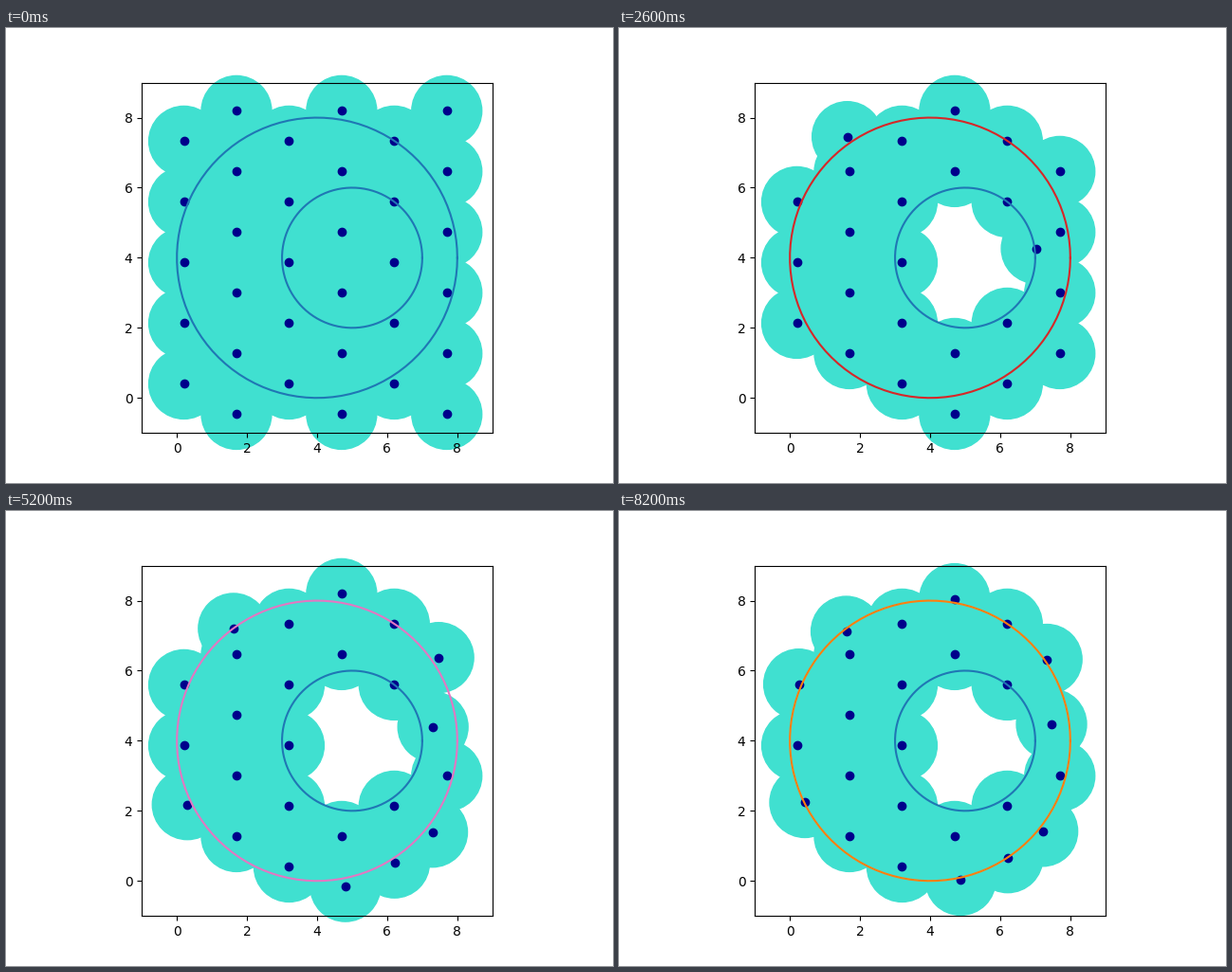
These frames come from a looping animation (640 by 480 pixels, 8.4 s). A matplotlib script:

```python
import numpy as np
import matplotlib.pyplot as plt
from matplotlib.animation import FuncAnimation
from matplotlib.patches import Circle

FRAMES, INTERVAL = 42, 200
OUTER, INNER = (4, 4, 4), (5, 4, 2)
USELESS = 0.9   # a disc this far off the ring is dropped
CROWD = 0.56    # a disc this close to a moved one is dropped
H = np.sqrt(3)

# Where the movable discs settle, keyed by lattice (column, row).
AIM = {
    (0, 1): (0.456, 2.252), (0, 3): (0.293, 5.63), (1, 5): (1.6, 7.04),
    (3, 0): (4.893, 0.088), (3, 5): (4.7, 8.015), (4, 0): (6.219, 0.71),
    (4, 2): (7.517, 4.498), (5, 1): (7.138, 1.44), (5, 4): (7.3, 6.311),
}


def lattice():
    return {(c, r): np.array([0.2 + 1.5 * c, 0.4 + H * (r - c % 2 / 2)])
            for c in range(6) for r in range(5 + c % 2)}


def gap(p):
    """Distance from p to the ring between the two circles."""
    (xo, yo, ro), (xi, yi, ri) = OUTER, INNER
    return max(np.hypot(p[0] - xo, p[1] - yo) - ro,
               ri - np.hypot(p[0] - xi, p[1] - yi))


def advance(discs, step):
    """Drop the most useless disc, or pull the one farthest from its aim."""
    discs = dict(discs)
    worst = max(discs, key=lambda k: gap(discs[k]))
    if gap(discs[worst]) > USELESS:
        del discs[worst]
        return discs
    key = max(AIM, key=lambda k: np.hypot(*(AIM[k] - discs[k])))
    pull = 0.26 + 0.4 * (step / FRAMES) ** 2
    pos = discs[key] + pull * (AIM[key] - discs[key])
    discs = {k: p for k, p in discs.items() if np.hypot(*(p - pos)) > CROWD}
    discs[key] = pos
    return discs


def ring(x, y, r):
    t = np.linspace(0, 2 * np.pi, 100)
    return ax.plot(x + r * np.cos(t), y + r * np.sin(t), color="C0")[0]


states = [lattice()]
for step in range(1, FRAMES):
    states.append(advance(states[-1], step))

fig, ax = plt.subplots(figsize=(6.4, 4.8), dpi=100)
ax.set_aspect("equal")
ax.set_xlim(-1, 9)
ax.set_ylim(-1, 9)

patches = {k: ax.add_patch(Circle(p, 1, color="turquoise", clip_on=False))
           for k, p in states[0].items()}
dots = ax.scatter(*zip(*states[0].values()), color="darkblue")
outer, inner = ring(*OUTER), ring(*INNER)


def update(step):
    discs = states[step]
    for key, patch in patches.items():
        patch.set_visible(key in discs)
        if key in discs:
            patch.set_center(discs[key])
    dots.set_offsets(list(discs.values()))
    outer.set_color(f"C{step % 10}")
    return [*patches.values(), dots, outer]


anim = FuncAnimation(fig, update, frames=FRAMES, interval=INTERVAL,
                     repeat=True, repeat_delay=0)
plt.show()
```
